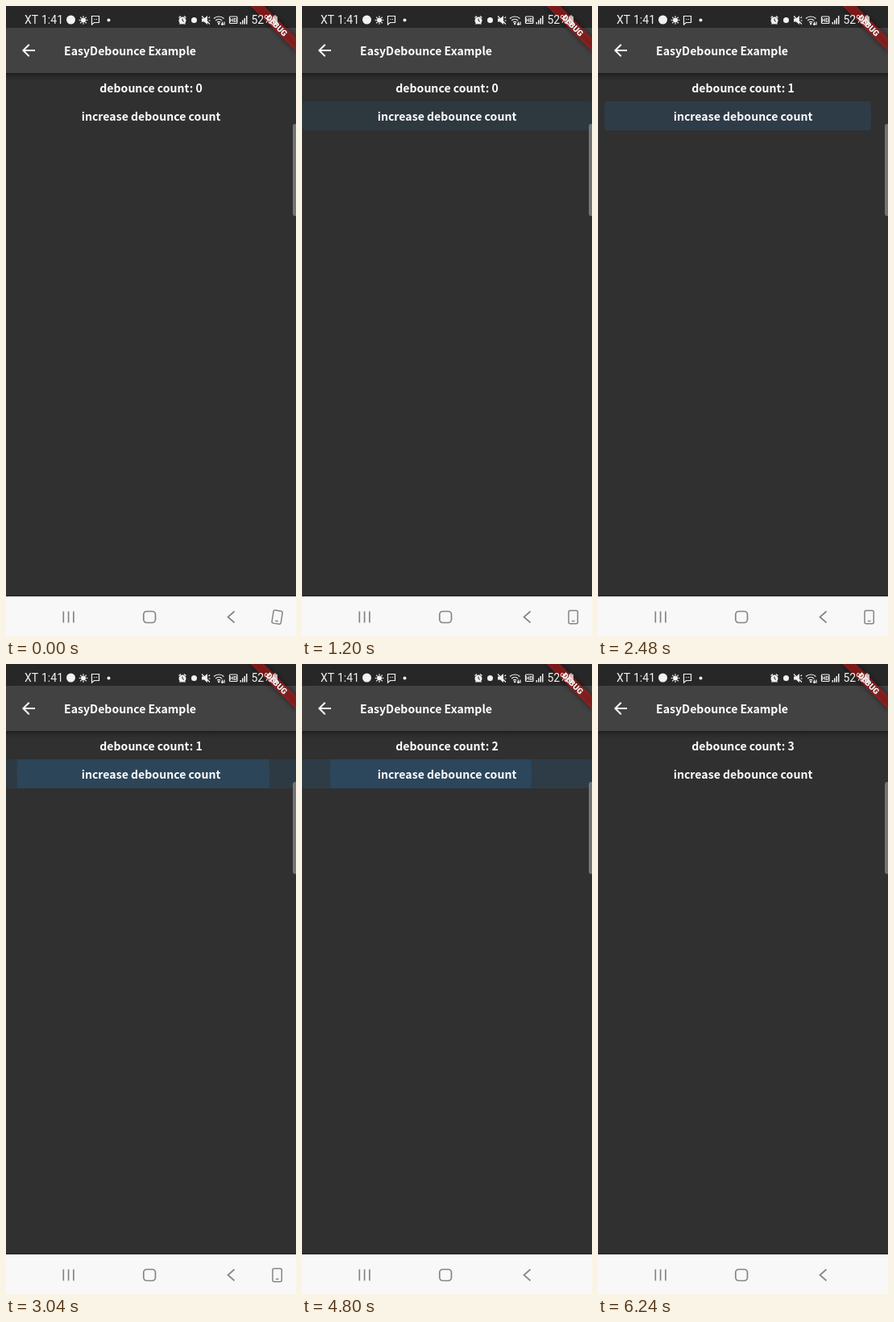
Write an HTML page that moves like this. It is 360x780 px and loops after 6560 ms.

```html
<!DOCTYPE html>
<html lang="en">
<head>
<meta charset="utf-8">
<title>EasyDebounce Example</title>
<style>
  html, body { margin: 0; width: 100%; height: 100%; overflow: hidden; background: #303030; }
  svg { display: block; width: 100vw; height: 100vh; }
  .app { font: 700 14.1px "Noto Sans CJK KR", "Noto Sans CJK JP", "Noto Sans CJK SC", "Noto Sans CJK", sans-serif; fill: #fff; }
  .status { font: 400 14px Roboto, sans-serif; fill: #f2f2f2; }
  .line { fill: none; stroke: #f2f2f2; stroke-width: 1.2; }
  .nav { fill: none; stroke: #858585; stroke-width: 1.7; }
  .mid { text-anchor: middle; }
</style>
</head>
<body>
<svg viewBox="0 0 360 780" preserveAspectRatio="none">
  <defs>
    <clipPath id="button"><rect y="118" width="360" height="36" rx="4"/></clipPath>
    <linearGradient id="shade" x2="0" y2="1">
      <stop offset="0" stop-color="#000" stop-opacity=".42"/>
      <stop offset=".4" stop-color="#000" stop-opacity=".16"/>
      <stop offset="1" stop-color="#000" stop-opacity="0"/>
    </linearGradient>
    <filter id="blur" x="-20%" y="-60%" width="140%" height="220%"><feGaussianBlur stdDeviation="3"/></filter>
  </defs>

  <rect width="360" height="780" fill="#303030"/>
  <rect y="83" width="360" height="9" fill="url(#shade)"/>
  <rect width="360" height="83" fill="#424242"/>
  <rect width="360" height="27" fill="#272727"/>

  <path transform="translate(16 43)" fill="#fff" d="M20 11H7.830l5.590-5.590L12 4l-8 8 8 8 1.410-1.410L7.830 13H20z"/>
  <text class="app" x="72" y="60.500">EasyDebounce Example</text>

  <g id="ripples" clip-path="url(#button)" fill="#2196f3"></g>
  <text id="count" class="app mid" x="180" y="107"></text>
  <text class="app mid" x="180" y="141.500">increase debounce count</text>
  <path d="M360 146h-1a3 3 0 0 0-3 3v108a3 3 0 0 0 3 3h1z" fill="#747474"/>

  <g transform="translate(360 0) rotate(45)">
    <rect x="-40" y="28" width="80" height="12" filter="url(#blur)" opacity=".5"/>
    <rect x="-40" y="28" width="80" height="12" fill="#b71c1c" fill-opacity=".63"/>
    <text class="mid" y="37.600" fill="#fff" style="font:900 10.200px Roboto,sans-serif">DEBUG</text>
  </g>

  <g class="status">
    <text x="23" y="22">XT</text>
    <text x="44" y="22">1:41</text>
    <circle cx="80.500" cy="17" r="5.500"/>
    <circle cx="96" cy="17.500" r="3"/>
    <g id="rays" class="line"></g>
    <path class="line" d="M106.500 12.500h9v8h-6l-3 2.500z"/>
    <path class="line" d="M109.500 16.500h1.200M112 16.500h1.200"/>
    <circle cx="127.500" cy="17.500" r="2"/>

    <circle cx="219" cy="18" r="4.500"/>
    <path class="line" d="M214.500 14.500l2.500-2M223.500 14.500l-2.500-2M215.500 22.500l1.500-1.500M222.500 22.500l-1.500-1.500"/>
    <path d="M219 15.500v2.500l2 1.500" fill="none" stroke="#272727"/>
    <circle cx="233.500" cy="17.500" r="3.500"/>
    <path d="M243 15.500h3l4-3.500v11l-4-3.500h-3z"/>
    <path class="line" d="M243 12.500l10 10M251.500 15l1.500-1.500M251.500 18h2"/>
    <path class="line" d="M258 15.500a9 9 0 0 1 12.500 0M260.200 18a6 6 0 0 1 8 0M262.200 20.300a3 3 0 0 1 4 0"/>
    <circle cx="264.200" cy="22" r="1.200"/>
    <path class="line" d="M268.500 19.500v4m-1.500-1.500l1.500 1.500 1.500-1.500M271 23.500v-4"/>
    <rect class="line" x="277.500" y="13" width="9.500" height="8.500" rx="1"/>
    <text class="mid" x="282.300" y="20" style="font-size:6.500px;font-weight:700">HD</text>
    <path d="M290.500 20h1.500v2.500h-1.500zM293 17.500h1.500v5H293zM295.500 15h1.500v7.500h-1.500zM298 12h1.500v10.500H298z"/>
    <text x="304.500" y="22">52%</text>
    <path d="M332.500 11.500h3v1.500h1.500v10h-6v-10h1.500z" opacity=".75"/>
  </g>

  <rect y="729" width="360" height="2" fill="#292929"/>
  <rect y="731" width="360" height="49" fill="#f8f8f8"/>
  <g class="nav">
    <path d="M71.300 749.500v14M77.600 749.500v14M83.900 749.500v14"/>
    <rect x="170.800" y="749.500" width="14.700" height="14" rx="4"/>
    <path d="M283.500 749.500l-8 7 8 7"/>
    <g id="rotate" stroke-width="1.500">
      <rect x="331" y="748.500" width="11.300" height="16.300" rx="2"/>
      <path d="M335 761.500h3.500"/>
    </g>
  </g>
</svg>
<script>
  const LOOP = 6560, STEP = 80, TAP_X = 137, RADIUS = 185.9, PRESSED = 0.12;
  const $ = id => document.getElementById(id);
  const clamp = v => Math.min(1, Math.max(0, v));
  const add = (parent, tag) => parent.appendChild(document.createElementNS("http://www.w3.org/2000/svg", tag));

  // Bursts of quick taps: first tap, gap, number of taps.
  const bursts = [[160, 153, 6], [2357, 144, 6], [4565, 165, 5]];
  const taps = bursts.flatMap(([start, gap, n]) =>
    Array.from({ length: n }, (_, i) => ({ time: start + i * gap, dot: add($("ripples"), "circle") })));
  const counted = [1920, 4320, 6240];

  for (let i = 0; i < 8; i++) {
    const ray = add($("rays"), "path");
    ray.setAttribute("d", "M96 12.200v1.800");
    ray.setAttribute("transform", `rotate(${i * 45} 96 17.500)`);
  }

  // cubic-bezier(.25, .1, .25, 1)
  function ease(x) {
    const bez = (a, b, s) => 3 * a * s * (1 - s) ** 2 + 3 * b * s * s * (1 - s) + s ** 3;
    let lo = 0, hi = 1;
    for (let i = 0; i < 20; i++) {
      const mid = (lo + hi) / 2;
      if (bez(0.25, 0.25, mid) < x) lo = mid; else hi = mid;
    }
    return bez(0.1, 1, lo);
  }

  function drawRipple({ time, dot }, t) {
    const age = t - time;
    const visible = age >= 0 && age < 375;
    dot.style.display = visible ? "" : "none";
    if (!visible) return;
    const p = ease(clamp(age / 225));
    dot.setAttribute("cx", TAP_X + (180 - TAP_X) * p);
    dot.setAttribute("cy", 136);
    dot.setAttribute("r", RADIUS * (0.3 + 0.7 * p));
    dot.setAttribute("opacity", PRESSED * clamp(age / 75) * clamp((375 - age) / 150));
  }

  function draw(ms) {
    const t = Math.floor((ms % LOOP) / STEP) * STEP;
    taps.forEach(tap => drawRipple(tap, t));
    $("count").textContent = "debounce count: " + counted.filter(c => t >= c).length;
    const tilt = 9 * (1 - clamp((t - 80) / 240));
    $("rotate").setAttribute("transform", `rotate(${tilt} 336.700 756.700)`);
    $("rotate").style.display = t < 4320 ? "" : "none";
  }

  const begin = performance.now();
  function tick() {
    draw(performance.now() - begin);
    requestAnimationFrame(tick);
  }
  tick();
</script>
</body>
</html>
```
